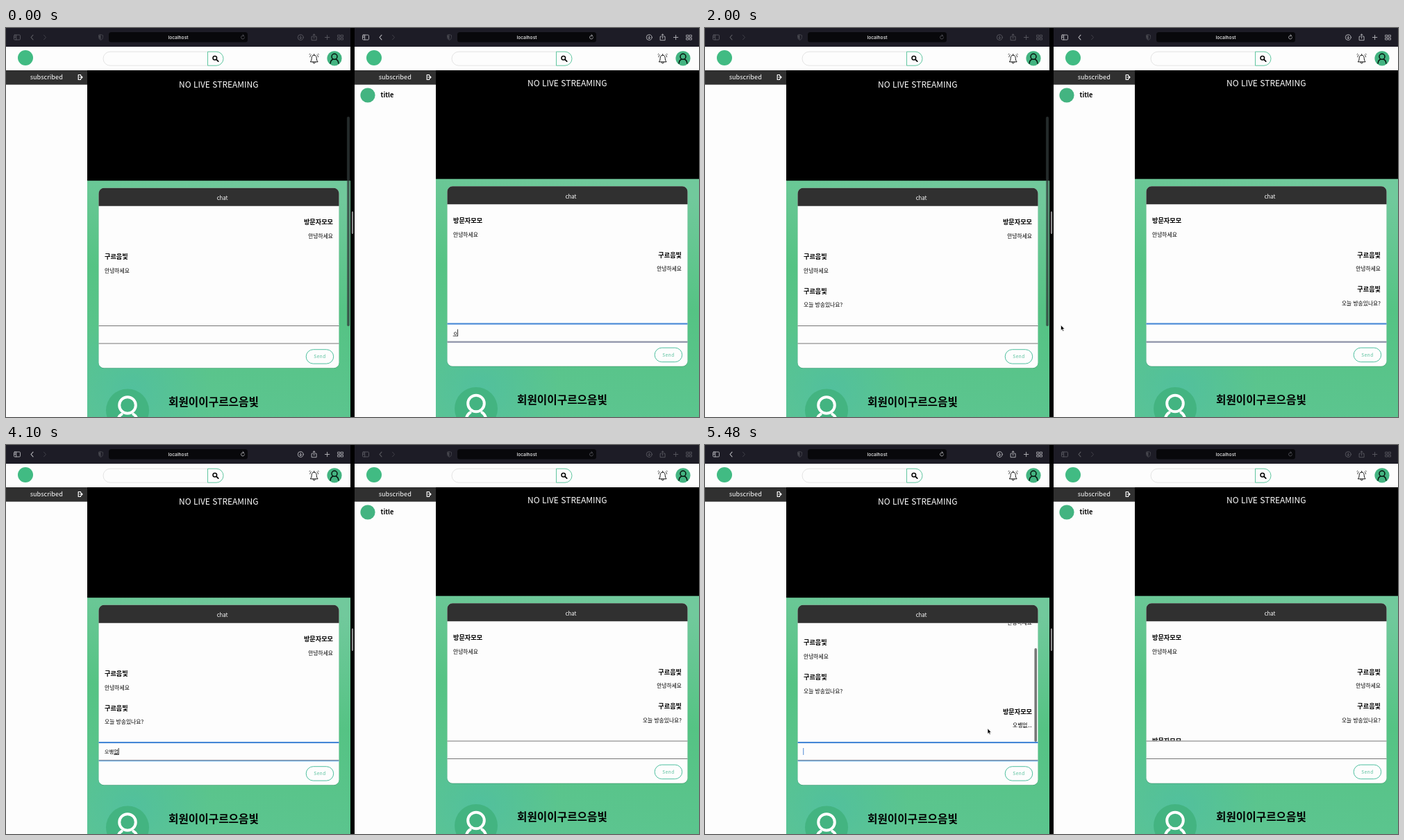
An HTML page that plays this animation: 998 px wide and 561 px high, repeating every 5.5 s.

```html
<!DOCTYPE html>
<html lang="ko">
<head>
<meta charset="utf-8">
<title>Live chat</title>
<style>
  html, body { margin: 0; width: 100%; height: 100%; overflow: hidden; background: #000; }
  svg { display: block; }
  text { font-family: "Noto Sans CJK KR", "Noto Sans KR", "Noto Sans", sans-serif; white-space: pre; }
  .mid { text-anchor: middle; }
  .end { text-anchor: end; }
  .name { font-size: 9.17px; font-weight: 700; }
  .msg { font-size: 7.8px; }
  .typed { font-size: 7.4px; }
  .line { fill: none; stroke: currentColor; stroke-linecap: round; stroke-linejoin: round; }
  .bar { color: #5b5b62; }
  .active .bar { color: #b9b9be; }
  .bar .dim { color: #45454c; }
  .blur-only, .active .focus-only { display: inline; }
  .focus-only, .active .blur-only { display: none; }
</style>
</head>
<body>
<svg id="stage" width="998" height="561" viewBox="0 0 998 561"></svg>
<script>
const LOOP = 5500;
const GUEST = '방문자모모', VIEWER = '구르음빛', CHANNEL = '회원이이구르으음빛';
const QUESTION = '오늘 방송있나요?', ANSWER = '오뱅없...';
const CLICK = 2500, ASKED = 1500, ANSWERED = 4750;
const ROW = 49.6, SCROLL = 44.6;

// Successive states of the input while syllables are composed
const asking = ['ㅇ', '오', '온', '오느', '오늘', '오늘 ',
  ...['ㅂ', '바', '방', '방ㅅ', '방소', '방송', '방송ㅇ', '방송이', '방송있',
    '방송있ㄴ', '방송있나', '방송있낭', '방송있나요', '방송있나요?'].map(s => '오늘 ' + s)];
const answering = ['ㅇ', '오', '옵', '오배', '오뱅', '오뱅ㅇ', '오뱅어', '오뱅업', '오뱅없',
  '오뱅없.', '오뱅없..', ANSWER];

const toolbar = `
  <rect width="496" height="27" fill="#1d1c26"/>
  <rect x="148" y="6" width="200" height="14.5" rx="3.5" fill="#08080b"/>
  <text class="mid" x="248" y="15.6" fill="#f2f2f2" style="font:500 6.7px Inter,sans-serif">localhost</text>
  <g class="bar line" stroke-width=".9">
    <rect x="11.5" y="10" width="9" height="7" rx="1.2"/><path d="M14.7 10v7M12.7 12h.8M12.7 13.6h.8"/>
    <path d="M39 10.2l-3 3.3 3 3.3" stroke-width="1.1"/>
    <g class="dim"><path d="M54.5 10.2l3 3.3-3 3.3" stroke="currentColor"/>
      <path d="M136.5 9.5l3 1v3q0 2.700-3 4-3-1.300-3-4v-3z" stroke="currentColor"/>
      <path d="M136.500 10v7q-2.400-1.200-2.500-3.600v-2.600z" fill="currentColor" stroke="none"/></g>
    <path d="M343.200 12.200a2.500 2.500 0 1 0 .3 1.700M341 9.500l1.500 1.300-1.600 1" stroke-width=".8"/>
    <circle cx="424.300" cy="13.500" r="4"/><path d="M424.300 11.300v4M422.700 13.900l1.600 1.600 1.600-1.600"/>
    <path d="M441.800 12.300h-1.700v5.400h7v-5.400h-1.700M443.600 15v-6M442 10.400l1.600-1.600 1.600 1.600"/>
    <path d="M459.400 13.500h6.400M462.600 10.300v6.400"/>
    <path d="M478 10.200h3v2.600h-3zM482.500 10.200h3v2.600h-3zM478 14.400h3v2.600h-3zM482.500 14.400h3v2.600h-3z" stroke-width=".8"/>
  </g>`;

const header = `
  <rect y="27" width="496" height="34" fill="#fdfdfd"/>
  <circle cx="28" cy="43" r="11" fill="#41bb83"/>
  <path d="M290.500 34.200H150a10 10 0 0 0 0 20h140.500" fill="#fdfdfd" stroke="#dedede" stroke-width=".8"/>
  <path d="M290.500 34.200H303a10 10 0 0 1 0 20H290.500z" fill="#fdfdfd" stroke="#4fc096" stroke-width=".9"/>
  <g class="line" color="#000"><circle cx="300.800" cy="43.200" r="2.800" stroke-width="1.500"/>
    <path d="M303 45.400l2.700 2.700" stroke-width="1.800"/></g>
  <g class="line" color="#151515" stroke-width="1">
    <path d="M438.600 48.600q1.600-1.500 1.600-5a3.500 4.300 0 0 1 7 0q0 3.500 1.600 5zM442.200 49.500a1.500 1.500 0 0 0 3 0M443.700 39v-1.300"/>
    <path d="M439.200 38.600q-1.300 1.200-1.400 3.200M437.800 37.200l-.7.900M448.200 38.600q1.300 1.200 1.400 3.200M449.600 37.200l.7.900" stroke-width=".8"/></g>
  <circle cx="473" cy="43.800" r="10.600" fill="#43b481"/>
  <g class="line" color="#06140d" stroke-width="1.500"><circle cx="473" cy="41.300" r="4"/>
    <path d="M467.200 51q.2-4.300 3-5.500M478.800 51q-.2-4.300-3-5.500"/></g>`;

const sidebar = follows => `
  <rect y="61" width="117" height="500" fill="#fdfdfd"/>
  <rect y="61" width="117" height="20.700" fill="#303030"/>
  <text class="mid" x="58.300" y="74" font-size="9.200" font-weight="500" fill="#fff">subscribed</text>
  <g class="line" color="#fff" stroke-width="1.200"><path d="M107.500 68.700v-1.200h-3.300v7h3.300v-1.200"/>
    <path d="M106.300 71h3.600M108.500 69.500l1.500 1.500-1.500 1.500"/></g>
  ${follows ? `<circle cx="19" cy="97" r="10.600" fill="#43b481"/>
  <text class="name" x="37.600" y="100">title</text>` : ''}`;

function message(row, name, body, right, id) {
  const y = 283.400 + row * ROW, at = right ? 'class="end' : 'class="', x = right ? 471 : 142;
  return `<g id="${id}"><text ${at} name" x="${x}" y="${y}">${name}</text>
    <text ${at} msg" x="${x}" y="${y + 19.800}">${body}</text></g>`;
}

function page(id, isGuest) {
  return `
  <rect x="117" y="50" width="379" height="170.200" fill="#000"/>
  <rect x="117" y="220.200" width="379" height="350" fill="url(#green)"/>
  <rect x="117" y="220.200" width="379" height="350" fill="url(#teal)"/>
  <text class="mid" x="306.300" y="86.300" font-size="12" font-weight="500" fill="#fff">NO LIVE STREAMING</text>
  <rect x="133.500" y="231" width="346" height="260" rx="7.500" fill="#2f7753" opacity=".45"/>
  <rect x="133.500" y="230.700" width="346" height="259.500" rx="7.500" fill="#fdfdfd"/>
  <path d="M133.500 256.700v-18.500a7.500 7.500 0 0 1 7.500-7.500h331a7.500 7.500 0 0 1 7.500 7.500v18.500z" fill="#303030"/>
  <text class="mid" x="311.600" y="248.300" font-size="7.800" font-weight="500" fill="#fff">chat</text>
  <g clip-path="url(#feed)"><g id="${id}Feed">
    ${message(0, GUEST, '안녕하세요', isGuest, id + 'M0')}
    ${message(1, VIEWER, '안녕하세요', !isGuest, id + 'M1')}
    ${message(2, VIEWER, QUESTION, !isGuest, id + 'Asked')}
    ${message(3, GUEST, ANSWER, isGuest, id + 'Answered')}
  </g></g>
  <g class="blur-only" fill="#767676"><rect x="133.500" y="429" width="346" height="1"/>
    <rect x="133.500" y="454.500" width="346" height="1"/></g>
  <g class="focus-only"><rect x="133.500" y="428" width="346" height="2.100" fill="#4486d6"/>
    <rect x="133.500" y="454.200" width="346" height="1" fill="#6b7086"/>
    <rect x="133.500" y="455.200" width="346" height="1.100" fill="${isGuest ? '#58a4dc' : '#858ba6'}"/></g>
  <text class="typed" x="141.700" y="445.200"><tspan id="${id}Done"></tspan><tspan id="${id}Comp" text-decoration="underline"></tspan></text>
  <rect id="${id}Caret" y="437" width=".9" height="10"/>
  <rect x="432.200" y="463.700" width="39.500" height="20.400" rx="10.200" fill="#fdfdfd" stroke="#4fc0a0"/>
  <text class="mid" x="452" y="476.100" font-size="6.500" letter-spacing=".45" fill="#56bf9c">Send</text>
  <circle cx="175" cy="551.500" r="31" fill="#43b481"/>
  <g class="line" color="#fff" stroke-width="4"><circle cx="175" cy="544" r="11.800"/>
    <path d="M160 572q0-11 6.500-15M190 572q0-11-6.500-15"/></g>
  <text x="234" y="544.500" font-size="15.700" font-weight="700">${CHANNEL}</text>`;
}

const view = (id, x, lift, isGuest) => `
  <g id="${id}" transform="translate(${x})" clip-path="url(#frame)">
    <g transform="translate(0 ${lift})">${page(id, isGuest)}</g>
    ${sidebar(!isGuest)}${header}${toolbar}
  </g>`;

const stage = document.getElementById('stage');
stage.innerHTML = `
  <defs>
    <clipPath id="frame"><rect width="496" height="561"/></clipPath>
    <clipPath id="feed"><rect x="133.500" y="256.700" width="346" height="172.300"/></clipPath>
    <linearGradient id="green" x1=".6" y1="0" x2=".4" y2="1">
      <stop stop-color="#71c99c"/><stop offset=".45" stop-color="#55c384"/><stop offset="1" stop-color="#5dc591"/>
    </linearGradient>
    <radialGradient id="teal" cx=".17" cy=".86" r=".3">
      <stop stop-color="#4bbda6" stop-opacity=".6"/><stop offset="1" stop-color="#4bbda6" stop-opacity="0"/>
    </radialGradient>
  </defs>
  <rect width="998" height="561"/>
  ${view('host', 0, 0, true)}
  ${view('fan', 502, -2.5, false)}
  <rect id="pageBar" x="491.200" y="128" width="3.600" height="302" rx="1.800" fill="#303a3a" fill-opacity=".75" stroke="#666" stroke-opacity=".25" stroke-width=".5"/>
  <rect id="feedBar" x="474.400" width="3.600" height="135" rx="1.800" fill="#777"/>
  <rect x="497.800" y="264.500" width="2.400" height="32.500" rx="1.200" fill="#8a8a8a"/>
  <path id="arrow" d="M0 0v7.600l1.700-1.500 1.200 2.700 1.300-.6-1.200-2.600h2.300z" fill="#000" stroke="#fff" stroke-width=".6"/>
  <path id="beam" class="line" color="#222" stroke-width=".8" d="M-1.800-4q1.500 0 1.800.8.300-.8 1.800-.8M0-3.200v6.400M-1.800 4q1.500 0 1.800-.8.300.8 1.800.8M-.8.800h1.600"/>`;

const el = Object.fromEntries([...stage.querySelectorAll('[id]')].map(n => [n.id, n]));
const clamp = v => Math.max(0, Math.min(1, v));
const smooth = v => (v = clamp(v), v * v * (3 - 2 * v));
const show = (node, on) => { node.style.display = on ? '' : 'none'; };

function typedAt(t, steps, start, gap, sent) {
  if (t < start || t >= sent) return '';
  return steps[Math.min(steps.length - 1, Math.floor((t - start) / gap))];
}

function setInput(id, value, focused, t) {
  const cut = value.length - (/[ㄱ-ㅎ가-힣]$/.test(value) ? 1 : 0);
  const done = el[id + 'Done'], comp = el[id + 'Comp'], caret = el[id + 'Caret'];
  done.textContent = value.slice(0, cut);
  comp.textContent = value.slice(cut);
  const blink = t % 1000 >= 250 && t % 1000 < 750;
  show(caret, focused && (value || blink));
  caret.setAttribute('x', 141.3 + (value ? done.parentNode.getComputedTextLength() : 0));
  caret.setAttribute('fill', value ? '#222' : '#3f7fd0');
}

// Pointer path: time, x, y
const visits = [
  [[1780, 700, 441], [2000, 512.500, 428.500], [2350, 330, 441], [2900, 330, 441]],
  [[4850, 352, 441], [5040, 401.500, 430.500], [5250, 406, 413], [5480, 407, 408.800], [LOOP, 407, 408.800]],
];

function pointerAt(t) {
  for (const path of visits) {
    const i = path.findIndex((p, k) => k && t >= path[k - 1][0] && t < p[0]);
    if (i < 1) continue;
    const [a, b] = [path[i - 1], path[i]], k = smooth((t - a[0]) / (b[0] - a[0]));
    return [a[1] + (b[1] - a[1]) * k, a[2] + (b[2] - a[2]) * k];
  }
}

function setPointer(t) {
  const p = pointerAt(t);
  const overInput = p && p[1] > 429 && (p[0] < 479 ? p[0] > 134 : p[0] > 636);
  show(el.arrow, p && !overInput);
  show(el.beam, p && overInput);
  if (p) (overInput ? el.beam : el.arrow).setAttribute('transform', `translate(${p})`);
}

function draw(t) {
  const hostActive = t >= CLICK;
  el.host.classList.toggle('active', hostActive);
  el.fan.classList.toggle('active', !hostActive);
  for (const id of ['host', 'fan']) {
    show(el[id + 'Asked'], t >= ASKED);
    show(el[id + 'Answered'], t >= ANSWERED);
  }
  setInput('fan', typedAt(t, asking, 0, 66, ASKED), !hostActive, t);
  setInput('host', typedAt(t, answering, 3000, 128, ANSWERED), hostActive, t);

  const k = smooth((t - 5120) / 300);
  el.hostFeed.setAttribute('transform', `translate(0 ${-SCROLL * k})`);
  el.feedBar.setAttribute('y', 258 + 35 * k);
  show(el.feedBar, k > 0);
  el.pageBar.style.opacity = t < CLICK ? 1 : Math.max(0, 1 - (t - CLICK) / 400);
  setPointer(t);
}

const begin = performance.now();
function tick() {
  draw((performance.now() - begin) % LOOP);
  requestAnimationFrame(tick);
}
tick();
</script>
</body>
</html>
```
